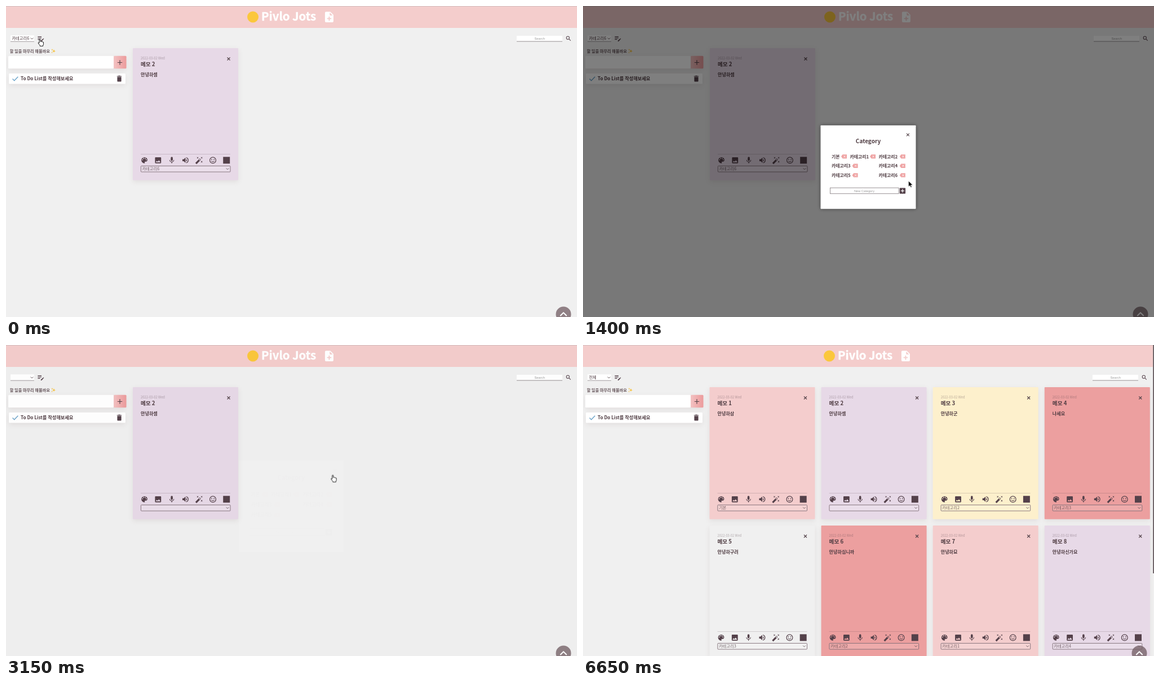
Write an HTML page that moves like this. It is 1013 by 553 pixels and loops after 7560 ms.

```html
<!DOCTYPE html>
<html>
<head>
<meta charset="utf-8">
<title>Pivlo Jots</title>
<style>
  html, body { margin: 0; width: 100%; height: 100%; overflow: hidden; background: #f0f0f0; }
  svg { display: block; width: 100%; height: 100%; }
  text { font-family: "Noto Sans CJK KR", "Noto Sans CJK", sans-serif; fill: #4f3c42; }
  .b { font-weight: 700; }
  .ui { font-family: "Liberation Sans", Arial, sans-serif; fill: #9a9a9a; text-anchor: middle; }
  .lift { filter: drop-shadow(0 3px 4px rgba(60, 20, 30, .08)); }
  .line { fill: none; stroke: #54444a; }
  #box { transform-origin: 506px 286.5px; }
  #panel { filter: drop-shadow(0 0 3px rgba(0, 0, 0, .45)); }
</style>
</head>
<body>
<svg id="stage" viewBox="0 0 1013 553"></svg>
<script>
const LOOP = 7560, STEP = 70, INK = '#54414a';
const PINK = '#f4cdcd', LILAC = '#e7d9e7', YELLOW = '#fdf0cc', RED = '#ec9f9f', GREY = '#f0f0f0';

const dot = (x, y, r) => `M${x - r} ${y}a${r} ${r} 0 1 0 ${2 * r} 0a${r} ${r} 0 1 0 ${-2 * r} 0z`;
const rect = (x, y, w, h, fill, more = '') =>
  `<rect x="${x}" y="${y}" width="${w}" height="${h}" fill="${fill}" ${more}/>`;
const text = (x, y, size, str, more = '') =>
  `<text x="${x}" y="${y}" font-size="${size}" ${more}>${str}</text>`;
const line = (d, width = 1, more = '') =>
  `<path class="line" d="${d}" stroke-width="${width}" ${more}/>`;
const cross = (x, y, r, width = 1.2, more = '') =>
  line(`M${x - r} ${y - r}l${2 * r} ${2 * r}m0 ${-2 * r}l${-2 * r} ${2 * r}`, width, more);
const plus = (x, y, r, width, more = '') =>
  line(`M${x - r} ${y}h${2 * r}M${x} ${y - r}v${2 * r}`, width, more);
const chevron = (x, y, w = 2.4, more = '') =>
  line(`M${x - w} ${y - w / 2}l${w} ${w}l${w} ${-w}`, .8, more);

// Icons on a 24 unit grid
const ICONS = {
  palette: 'M12 3a9 9 0 0 0 0 18c1.5 0 1.9-1.4 1.1-2.5-.9-1.1-.1-2.5 1.1-2.5H16c2.8 0 5-2.2 5-5 0-4.4-4-8-9-8z' +
    dot(6.5, 10.5, 1.5) + dot(9.5, 6.5, 1.5) + dot(14.5, 6.5, 1.5) + dot(17.5, 10.5, 1.5),
  image: 'M21 19V5c0-1.1-.9-2-2-2H5c-1.1 0-2 .9-2 2v14c0 1.1.9 2 2 2h14c1.1 0 2-.9 2-2zM8.5 13.5l2.5 3L14.5 12l4.5 6H5z',
  mic: 'M12 14a3 3 0 0 0 3-3V5a3 3 0 0 0-6 0v6a3 3 0 0 0 3 3zm5.3-3a5.3 5.1 0 0 1-10.6 0H5c0 3.4 2.7 6.2 6 6.7V21h2v-3.3c3.3-.5 6-3.3 6-6.7z',
  sound: 'M3 9v6h4l5 5V4L7 9zm13.5 3c0-1.8-1-3.3-2.5-4v8c1.5-.7 2.5-2.2 2.5-4zM14 3.2v2.1a7 7 0 0 1 0 13.4v2.1a9 9 0 0 0 0-17.6z',
  wand: 'M7.5 5.6L10 7 8.6 4.5 10 2 7.5 3.4 5 2l1.4 2.5L5 7zm12 9.8L17 14l1.4 2.5L17 19l2.5-1.4L22 19l-1.4-2.5L22 14z' +
    'M22 2l-2.5 1.4L17 2l1.4 2.5L17 7l2.5-1.4L22 7l-1.4-2.5zM13.7 6.6L.6 19.7l3.7 3.7L17.4 10.3zm-.4 6.2l-2.1-2.1 2.5-2.5 2.1 2.1z',
  smile: dot(12, 12, 10) + dot(12, 12, 8) + dot(8.5, 9.5, 1.5) + dot(15.5, 9.5, 1.5) +
    'M6.9 14a5.5 5.5 0 0 0 10.2 0h-2a3.6 3.6 0 0 1-6.2 0z',
  addNote: 'M14 2H6a2 2 0 0 0-2 2v16a2 2 0 0 0 2 2h12a2 2 0 0 0 2-2V8zm2 14h-3v3h-2v-3H8v-2h3v-3h2v3h3zm-3-7V3.5L18.5 9z',
  edit: 'M3 10h11v2H3zm0-4h11v2H3zm0 8h7v2H3zm15-1.1l.7-.7a1 1 0 0 1 1.4 0l.7.7a1 1 0 0 1 0 1.4l-.7.7zm-.7.7L12 18.9V21h2.1l5.3-5.3z',
  search: dot(9.5, 9.5, 6.5) + dot(9.5, 9.5, 4.5) + 'M15.5 14l5 5-1.5 1.5-5-5-.3-1 .8-.8z',
  trash: 'M6 19c0 1.1.9 2 2 2h8c1.1 0 2-.9 2-2V7H6zM19 4h-3.5l-1-1h-5l-1 1H5v2h14z'
};
// Centred at x, y
const icon = (name, x, y, k = .6, fill = INK) =>
  `<path d="${ICONS[name]}" fill="${fill}" fill-rule="evenodd" transform="translate(${x - 12 * k} ${y - 12 * k}) scale(${k})"/>`;

const TOOLS = ['palette', 'image', 'mic', 'sound', 'wand', 'smile'];
function card(x, y, color, n, body, label) {
  return `<g transform="translate(${x} ${y})">` +
    rect(0, 0, 187, 234.7, color, 'rx="1" class="lift"') +
    text(14, 19.6, 5.8, '2022-03-02 Wed', 'style="fill:#54414a" opacity=".4"') +
    text(14, 31.7, 9.6, '메모 ' + n, 'class="b"') +
    text(14, 50.4, 8.1, body, 'class="b"') +
    cross(170, 19, 2.5) +
    rect(14, 188, 159, .8, INK, 'opacity=".25"') +
    TOOLS.map((t, i) => icon(t, 20.5 + i * 24.3, 199.3)).join('') +
    rect(160.2, 193.3, 12, 12, INK) +
    rect(14.4, 209.4, 158.6, 10.6, '#fff', 'fill-opacity=".12" stroke="#7d6d75" stroke-width=".9" rx="1"') +
    chevron(168, 214.6, 2.3) +
    label + '</g>';
}
const cardLabel = s => text(16.4, 217.3, 7.3, s, 'opacity=".75"');

const tag = (x, y) =>
  `<path d="M${x - 5} ${y}l2.6-3.7h7.4v7.4h-7.4z" fill="#efa3a3"/>` + cross(x + 1, y, 1.6, .9, 'style="stroke:#fff"');
const category = (x, y, tx, name) => text(x, y + 2.9, 7.9, name, 'class="b"') + tag(tx, y);

const spark = (x, y, r) =>
  `<path d="M${x} ${y - r}Q${x} ${y} ${x + r} ${y}Q${x} ${y} ${x} ${y + r}Q${x} ${y} ${x - r} ${y}Q${x} ${y} ${x} ${y - r}" fill="#f5c242"/>`;

const notes = [
  [PINK, '안녕하삼', '기본'], [LILAC, '안녕하셈', ''], [YELLOW, '안녕하군', '카테고리2'], [RED, '냐세요', '카테고리3'],
  [GREY, '안녕하구려', '카테고리3'], [RED, '안녕하십니까', '카테고리2'], [PINK, '안녕하묘', '카테고리1'], [LILAC, '안녕하신가요', '카테고리4']
];

stage.innerHTML = `
  <defs><linearGradient id="blush"><stop stop-color="#f3c2c2"/><stop offset="1" stop-color="#ec9b9c"/></linearGradient></defs>
  ${rect(0, 0, 1013, 553, GREY)}
  ${rect(0, 0, 1013, 39, '#f4cdcc')}
  ${rect(0, 0, 1013, .8, '#cdbcbc')}
  <g id="brand">
    <circle cx="438" cy="19.5" r="10" fill="#fbc73c"/>
    ${text(453, 26.4, 20.3, 'Pivlo Jots', 'class="b" style="fill:#fff;stroke:#fff;stroke-width:.4;stroke-linejoin:round"')}
    ${icon('addNote', 573.4, 19.6, .94, '#fff')}
  </g>

  ${rect(8, 52.3, 42, 10.6, '#fff')}${rect(8, 62.7, 42, .8, '#8b8488')}
  ${chevron(46, 57.8, 2.4)}
  ${text(10.4, 60.4, 7.3, '카테고리6', 'id="pick6"')}
  ${text(10.4, 60.4, 7.3, '전체', 'id="pickAll"')}
  ${icon('edit', 61.8, 57.6, .6)}
  <g id="find">
    ${rect(906, 53, 81, 9.8, '#fff')}${rect(906, 62.5, 81, .9, '#8b8488')}
    ${text(946.7, 60.2, 5.8, 'Search', 'class="ui"')}
    ${icon('search', 998, 57.9, .48)}
  </g>

  ${text(6.8, 82.8, 7.2, '할 일을 마무리 해볼까요', 'class="b" opacity=".85"')}
  ${spark(85, 80.2, 3.6)}${spark(82, 77.8, 1.7)}${spark(81.7, 82.8, 1.5)}
  <g class="lift">${rect(4, 88.8, 187, 22.4, '#fff', 'rx="1.5"')}${rect(191, 88.8, 22.5, 22.4, 'url(#blush)', 'rx="1.5"')}</g>
  ${plus(202, 100.5, 4.2, 1.2)}
  ${rect(5, 120, 207, 18.6, '#fff', 'rx="1.5" class="lift"')}
  ${line('M11.6 129.6l3.1 3.1l6.6-7', 1.4, 'style="stroke:#6aa3c8"')}
  ${text(26, 132.2, 8.2, 'To Do List를 작성해보세요', 'class="b"')}
  ${icon('trash', 201, 129.2, .6)}

  <g id="single">${card(225, 75, LILAC, 2, '안녕하셈', `<g id="label6">${cardLabel('카테고리6')}</g>`)}</g>
  <g id="all">
    ${notes.map(([c, body, cat], i) =>
      card(224.5 + i % 4 * 198.1, 75 + (i >> 2) * 246, c, i + 1, body, cardLabel(cat))).join('')}
    ${rect(1011, 0, 2, 553, '#f0f0f0')}${rect(1011.3, 0, 1.7, 406, '#5d5256')}
  </g>
  <g id="up">
    <circle cx="989" cy="548" r="13.5" fill="#715c62" opacity=".76"/>
    ${line('M983.3 551l5.7-5.7l5.7 5.7', 2, 'style="stroke:#fff"')}
  </g>

  <g id="modal">
    ${rect(0, 0, 1013, 553, '#000', 'opacity=".5"')}
    <g id="box">
      ${rect(421.5, 212.3, 169, 148.5, '#fff', 'id="panel" rx="1"')}
      ${cross(576.4, 229, 2.4)}
      ${text(506, 244.4, 10, 'Category', 'class="b" text-anchor="middle"')}
      ${category(441, 267.6, 463, '기본')}
      ${category(473.4, 267.6, 514, '카테고리1')}
      ${category(524.4, 267.6, 566.8, '카테고리2')}
      ${category(441, 284.2, 482.6, '카테고리3')}
      ${category(524.4, 284.2, 566.8, '카테고리4')}
      ${category(441, 300.9, 482.6, '카테고리5')}
      <g id="cat6">${category(524.4, 300.9, 566.8, '카테고리6')}</g>
      ${rect(438.5, 323.3, 121.5, 10.4, '#fff', 'stroke="#8f878b" stroke-width=".9"')}
      ${text(499, 330.7, 5.7, 'New Category', 'class="ui"')}
      ${rect(561.7, 323.4, 10.4, 10.4, INK, 'rx="1"')}
      ${plus(566.9, 328.6, 3, 1.3, 'style="stroke:#fff"')}
    </g>
  </g>

  <g id="cursor">
    <path id="arrow" d="M0 0v10.4l2.4-2.2l1.6 3.6l1.8-.8l-1.6-3.5h3.3z" fill="#000" stroke="#fff" stroke-width=".7"/>
    <path id="hand" d="M-.9 6.6V1a1 1 0 0 1 2 0v3.2q1.7-.9 2 .3q1.5-.6 1.8.5q1.6-.4 1.6 1v2.6q0 1.6-1 2.4v1.3h-5.2v-1.2q-1.6-1.5-3.2-4.3q.2-1.6 2-.2z"
      fill="#fff" stroke="#000" stroke-width=".9" stroke-linejoin="round"/>
  </g>`;

const anims = [];
// rows: [ms, value, easing]
function track(id, prop, rows, easing = 'linear') {
  const frames = rows.map(([ms, value, ease]) => ({ offset: ms / LOOP, [prop]: value, easing: ease || easing }));
  frames.push({ offset: 1, [prop]: rows[rows.length - 1][1] });
  const a = document.getElementById(id).animate(frames, { duration: LOOP, iterations: Infinity });
  a.pause();
  anims.push(a);
}
const HOLD = 'steps(1, end)';
const show = (id, ...rows) => track(id, 'opacity', rows, HOLD);
const shift = (id, dx) => track(id, 'transform', [[0, 'translate(0px)'], [ALL, `translate(${dx}px)`]], HOLD);

const OPEN = 170, REMOVE = 1750, CLOSE = 2940, FADE = 250, ALL = 5390;
const fade = (off, on) => [
  [0, off], [OPEN, off, 'ease'], [OPEN + FADE, on],
  [CLOSE, on, 'ease'], [CLOSE + FADE, off]
];
track('modal', 'opacity', fade(0, 1));
track('box', 'transform', fade('scale(1.1)', 'scale(1)'));

['pick6', 'label6', 'cat6'].forEach(id => show(id, [0, 1], [REMOVE, 0]));
show('pickAll', [0, 0], [ALL, 1]);
show('single', [0, 1], [ALL, 0]);
show('all', [0, 0], [ALL, 1]);
shift('brand', -1);
shift('find', -2);
shift('up', -2);

show('hand', [0, 1], [210, 0], [1470, 1], [1820, 0], [2870, 1], [3220, 0]);
show('arrow', [0, 0], [210, 1], [1470, 0], [1820, 1], [2870, 0], [3220, 1]);

const PATH = [
  [0, 60, 59], [140, 60, 59], [210, 59, 59], [350, 59, 59], [630, 353, 205], [770, 353, 205],
  [980, 516, 276], [1050, 516, 276], [1260, 584, 318], [1540, 571, 304], [1750, 571, 304],
  [1890, 578, 309], [2170, 578, 309], [2520, 578.5, 235], [2800, 578.5, 235], [2940, 580, 231.5],
  [3150, 580, 231.5], [3360, 408, 157], [3500, 408, 157], [3710, 119, 75], [3850, 119, 75],
  [4200, 70, 105], [4620, 30, 57], [4760, 33, 59], [4900, 33, 59], [5320, 35, 59],
  [5880, 35, 59], [6300, 517, 485], [6440, 517, 485], [6650, 515, 562]
];
track('cursor', 'transform', PATH.map(([ms, x, y]) => [ms, `translate(${x}px, ${y}px)`]));

let start;
function tick(now) {
  if (start === undefined) start = now;
  const t = Math.min(Math.floor((now - start) % LOOP / STEP) * STEP, 6650);
  anims.forEach(a => { a.currentTime = t + .5; });
  requestAnimationFrame(tick);
}
requestAnimationFrame(tick);
</script>
</body>
</html>
```
